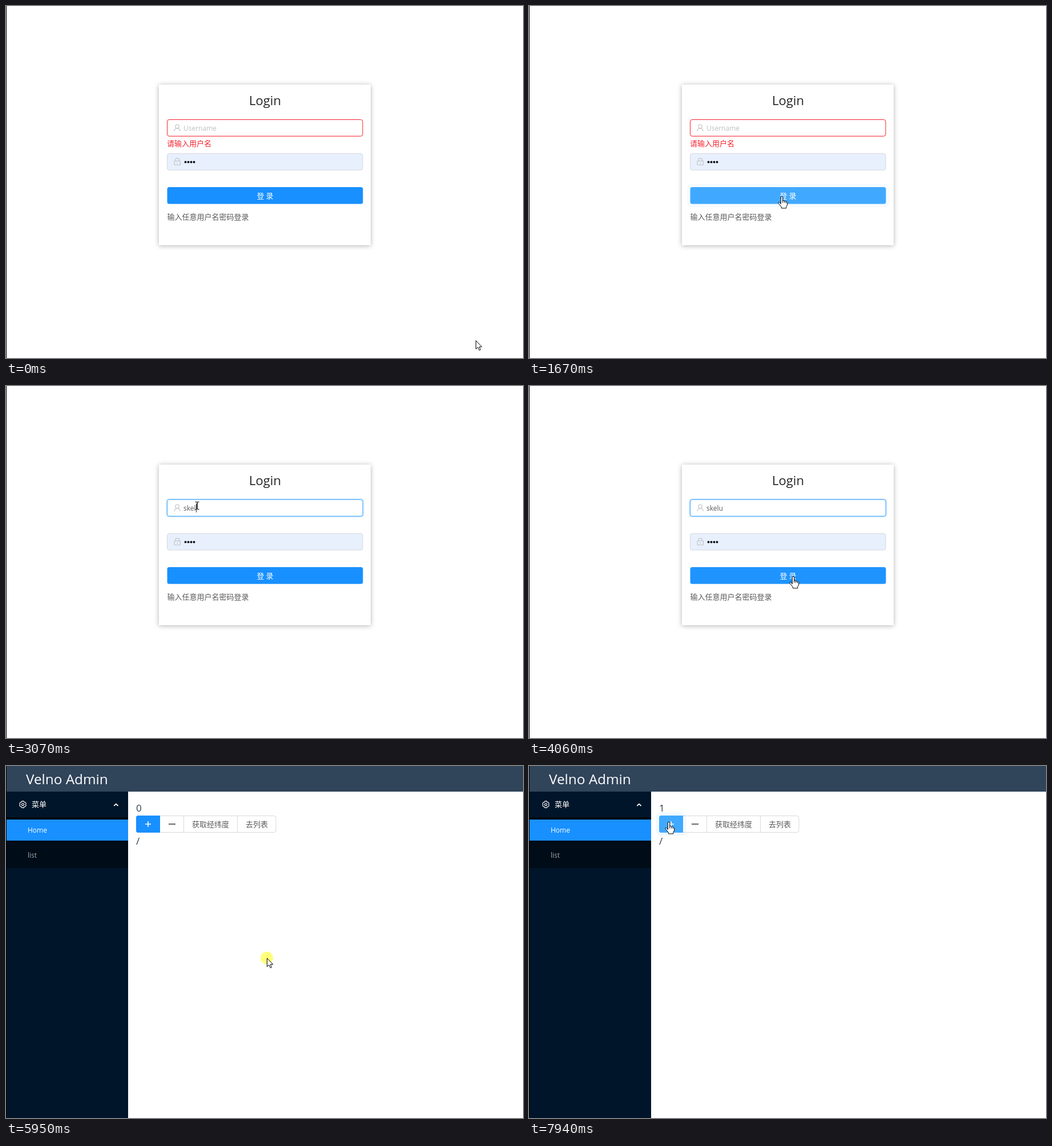
Write an HTML page that moves like this. It is 906x618 px and loops after 8000 ms.

```html
<!DOCTYPE html>
<html lang="zh-CN">
<head>
<meta charset="utf-8">
<title>Login</title>
<style>
html, body { margin: 0; width: 100%; height: 100%; overflow: hidden; background: #fff; }
svg { display: block; }
text { font: 12px "Open Sans", "Noto Sans CJK SC", "Noto Sans CJK", sans-serif; white-space: pre; }
.zh { font: 13px "Noto Sans CJK SC", "Noto Sans CJK", sans-serif; }
.gray { fill: #595959; }
.icon { fill: none; stroke: #bfbfbf; stroke-width: 1.1; }
.card { fill: #fff; filter: drop-shadow(0 1px 4px rgba(0,0,0,.3)); }
.pop { fill: #fff; filter: drop-shadow(0 1px 1.5px rgba(0,0,0,.35)); }
.dots { fill: none; stroke-linecap: round; stroke-width: 4; }
.cursor path { fill: #fff; stroke: #000; stroke-linejoin: round; }
</style>
</head>
<body>
<svg width="906" height="618" viewBox="0 0 906 618">
  <defs>
    <linearGradient id="shade" x2="0" y2="1">
      <stop stop-color="#000" stop-opacity=".6"/>
      <stop offset="1" stop-color="#000" stop-opacity="0"/>
    </linearGradient>
  </defs>
  <rect width="906" height="618" fill="#fff"/>

  <g id="login">
    <rect class="card" x="268" y="138" width="371" height="282"/>
    <text x="454" y="174" text-anchor="middle" style="font-size:22px" fill="#222">Login</text>

    <rect id="glow" x="281.5" y="198.5" width="345" height="31" rx="4.5" fill="none" stroke-width="2" opacity=".25"/>
    <rect id="field" x="282.5" y="199.5" width="342.5" height="29" rx="3.5" fill="#fff"/>
    <g class="icon">
      <circle cx="300" cy="211.4" r="3.2"/>
      <path d="M294.8 220c.4-3.4 2.4-5.2 5.2-5.2s4.8 1.8 5.2 5.2"/>
    </g>
    <text id="hint" x="311" y="219" fill="#bfbfbf">Username</text>
    <text id="user" x="311" y="219" class="gray"></text>
    <path id="caret" stroke="#333" d="M.5 207v15"/>
    <text id="error" class="zh" x="282" y="245.5" fill="#f5222d">请输入用户名</text>

    <rect x="282.5" y="259" width="342.5" height="29" rx="3.5" fill="#e8f0fe" stroke="#d3d7de"/>
    <g class="icon">
      <rect x="295" y="272" width="10.4" height="7" rx=".5"/>
      <path d="M297 272v-2.2a3.2 2.6 0 0 1 6.4 0v2.2M300.2 274.4v2.4"/>
    </g>
    <path class="dots" stroke="#111" d="M314.5 274h0m5 0h0m5 0h0m5 0h0"/>

    <rect id="loginWave" fill="none" stroke="#1890ff"/>
    <rect id="loginBtn" x="282.5" y="318" width="343" height="29.5" rx="3.5"/>
    <text class="zh" x="454" y="337.5" text-anchor="middle" fill="#fff">登 录</text>
    <text class="zh gray" x="282.5" y="374.5">输入任意用户名密码登录</text>

    <g id="popup">
      <rect class="pop" x="282.5" y="231" width="343" height="159" rx="2"/>
      <path fill="#f7f9fb" d="M282.5 352h343v36a2 2 0 0 1-2 2h-339a2 2 0 0 1-2-2z"/>
      <path stroke="#e0e3e7" d="M282.5 352.5h343"/>
      <rect x="293" y="256" width="15.5" height="15.5" rx="2" fill="#20232a"/>
      <rect x="293" y="310" width="15.5" height="15.5" rx="2" fill="#20232a"/>
      <text x="319.5" y="258.5" style="font-size:12.5px" fill="#222">orlu</text>
      <text x="319.5" y="312.5" style="font-size:12.5px" fill="#222">vec</text>
      <path class="dots" stroke="#666055" d="M322.5 275h0m5.3 0h0m5.3 0h0m5.3 0h0M322.5 329h0m5.3 0h0m5.3 0h0m5.3 0h0"/>
      <text class="zh" x="293" y="376" fill="#4a4f55">管理密码...</text>
    </g>
  </g>

  <g id="home">
    <rect width="906" height="45" fill="#30445a"/>
    <text x="35" y="32" style="font-size:24.3px" fill="#fff">Velno Admin</text>
    <rect y="45" width="214" height="573" fill="#001529"/>
    <rect y="90" width="214" height="89" fill="#000c17"/>
    <rect y="90" width="214" height="9" fill="url(#shade)"/>
    <rect y="94" width="214" height="37" fill="#1890ff"/>
    <g fill="none" stroke="#fff" stroke-width="1.1">
      <circle cx="29.5" cy="67.5" r="2"/>
      <path stroke-linejoin="round" d="M27.9 61.6h3.2l.6 1.9 2 .1 1.6 2.4-1.2 1.5 1.2 1.6-1.6 2.4-2 .1-.6 1.8h-3.2l-.6-1.8-2-.1-1.6-2.4 1.2-1.6-1.2-1.5 1.6-2.4 2-.1z"/>
      <path stroke-width="1.7" d="M189.3 70l3.6-3.3 3.6 3.3"/>
    </g>
    <text class="zh" x="45" y="72.3" style="font-weight:500" fill="#fff">菜单</text>
    <text x="38" y="116.7" fill="#fff">Home</text>
    <text x="38" y="161" fill="#a3a7ab">list</text>

    <text id="count" x="228" y="80" style="font-size:17px" fill="#2c3e50"></text>
    <rect x="228.5" y="87.5" width="244.5" height="29" rx="3.5" fill="#fff" stroke="#d9d9d9"/>
    <path stroke="#d9d9d9" d="M311.5 87.5v29M405.5 87.5v29"/>
    <rect id="plusWave" fill="none" stroke="#1890ff"/>
    <path id="plusBtn" d="M231.5 87H270v30h-38.500a3.500 3.500 0 0 1-3.500-3.500v-23a3.500 3.500 0 0 1 3.500-3.500z"/>
    <path stroke="#fff" stroke-width="1.6" d="M244 102h10M249 97v10"/>
    <path stroke="#444" stroke-width="1.6" d="M285 102h12"/>
    <text class="zh gray" x="326" y="107.3">获取经纬度</text>
    <text class="zh gray" x="420" y="107.3">去列表</text>
    <text x="228" y="138" style="font-size:17px" fill="#2c3e50">/</text>
  </g>

  <path stroke="#000" d="M.5 0v618"/>

  <g id="mouse" class="cursor">
    <circle id="press" r="11" fill="#ff0" opacity=".52"/>
    <path id="arrow" d="M.5.5v14.700l3.400-3.100 2.400 5.400 2.300-1-2.300-5.200h4.500z"/>
    <path id="hand" d="M-1.700 12.500V1a1.700 1.700 0 0 1 3.400 0v6.200c.8-1 2.700-.7 3 .6 1-.7 2.500-.3 2.800.9 1-.4 2.200.2 2.200 1.500v3.800l-1.900 3.600v2.400H-.6v-2L-5.800 11.300c-.8-1.300.7-2.600 2-1.600z M1.700 7v3.500M4.700 8v2.700M7.500 9v2"/>
    <path id="beam" style="fill:none" d="M-3.500-6.500h2.300q1.200 0 1.200 1.200V5.300q0 1.200-1.200 1.200H-3.500M3.500-6.500H1.200Q0-6.500 0-5.300V5.300q0 1.200 1.200 1.200H3.500"/>
  </g>
</svg>
<script>
const LOOP = 8000, HOME_AT = 4310;
const $ = id => document.getElementById(id);
const show = (id, on) => $(id).style.display = on ? '' : 'none';
const set = (id, attrs) => { for (const k in attrs) $(id).setAttribute(k, attrs[k]); };
const clamp = v => Math.max(0, Math.min(1, v));
const between = (t, a, b) => t >= a && t < b;
const inOut = p => p < .5 ? 4 * p ** 3 : 1 - 4 * (1 - p) ** 3;

// time, x, y of the pointer's hot spot
const route = [
  [30, 823, 587], [810, 459, 362], [870, 459, 362], [1110, 454, 346], [1270, 454, 346],
  [1440, 450, 341], [1600, 450, 341], [1670, 443, 335], [1720, 443, 335], [1980, 324, 215],
  [2060, 324, 215], [2130, 335, 210], [3150, 335, 210], [3530, 395, 166], [3610, 395, 166],
  [4050, 463, 335], [4170, 463, 335], [4310, 457, 337], [5290, 457, 337], [5320, 467, 330],
  [5370, 467, 330], [5390, 457, 337], [6740, 457, 337], [7560, 245, 99]
];
const presses = [[1290, 1440], [2130, 2290], [4140, 4290], [5950, 6100], [7630, 7790]];
const name = 'skelu', keys = [2550, 2770, 2850, 2960, 3080];

function pointer(t) {
  const i = route.findIndex(p => p[0] > t);
  if (i === 0) return route[0].slice(1);
  if (i < 0) return route.at(-1).slice(1);
  const [t0, x0, y0] = route[i - 1], [t1, x1, y1] = route[i];
  const p = (t - t0) / (t1 - t0), e = p * p * (3 - 2 * p);
  return [x0 + (x1 - x0) * e, y0 + (y1 - y0) * e];
}

function cursorKind(x, y, home) {
  const inside = (l, top, r, b) => x >= l && x <= r && y >= top && y <= b;
  if (home) return inside(228, 87, 270, 117) ? 'hand' : 'arrow';
  if (inside(282, 318, 626, 348)) return 'hand';
  return inside(282, 199, 626, 229) || inside(282, 259, 626, 288) ? 'beam' : 'arrow';
}

function blue(since, t) {
  const p = inOut(clamp((t - since) / 300));
  return `rgb(${24 + 40 * p},${144 + 25 * p},255)`;
}

// Ring that spreads from a pressed button and fades
function wave(id, age, x, y, w, h) {
  show(id, between(age, 0, 2000));
  const s = 6 * (1 - (1 - clamp(age / 400)) ** 3);
  set(id, {
    x: x - s / 2, y: y - s / 2, width: w + s, height: h + s, rx: 3.5 + s / 2,
    'stroke-width': s, opacity: .25 * clamp(1 - age / 2000) ** 12
  });
}

function drawLogin(t) {
  const typed = keys.filter(k => k <= t).length;
  const focus = t >= 2130, valid = t >= 2700;
  const tone = !valid ? '#f5222d' : '#40a9ff';
  set('field', { stroke: tone });
  set('glow', { stroke: valid ? '#1890ff' : tone });
  show('glow', focus);
  show('hint', !typed);
  show('error', !valid);
  show('popup', between(t, 2210, 2770));
  $('user').textContent = name.slice(0, typed);
  const lastKey = typed ? keys[typed - 1] : 2130;
  show('caret', focus && Math.floor((t - lastKey) / 530) % 2 === 0);
  const end = typed ? $('user').getComputedTextLength() : 0;
  set('caret', { transform: `translate(${Math.round(311 + end)} 0)` });
  set('loginBtn', { fill: blue(t < 2290 ? 940 : 3955, t) });
  wave('loginWave', t - (t < 3000 ? 1370 : 4215), 282.5, 318, 343, 29.5);
}

function drawHome(t) {
  $('count').textContent = t < 7710 ? 0 : 1;
  set('plusBtn', { fill: blue(7400, t) });
  wave('plusWave', t - 7710, 228, 87, 42, 30);
}

function frame() {
  const t = performance.now() % LOOP, home = t >= HOME_AT;
  show('login', !home);
  show('home', home);
  home ? drawHome(t) : drawLogin(t);
  const [x, y] = pointer(t), kind = cursorKind(x, y, home);
  set('mouse', { transform: `translate(${Math.round(x)} ${Math.round(y)})` });
  for (const id of ['arrow', 'hand', 'beam']) show(id, id === kind);
  show('press', presses.some(([a, b]) => between(t, a, b)));
  requestAnimationFrame(frame);
}
frame();
</script>
</body>
</html>
```
